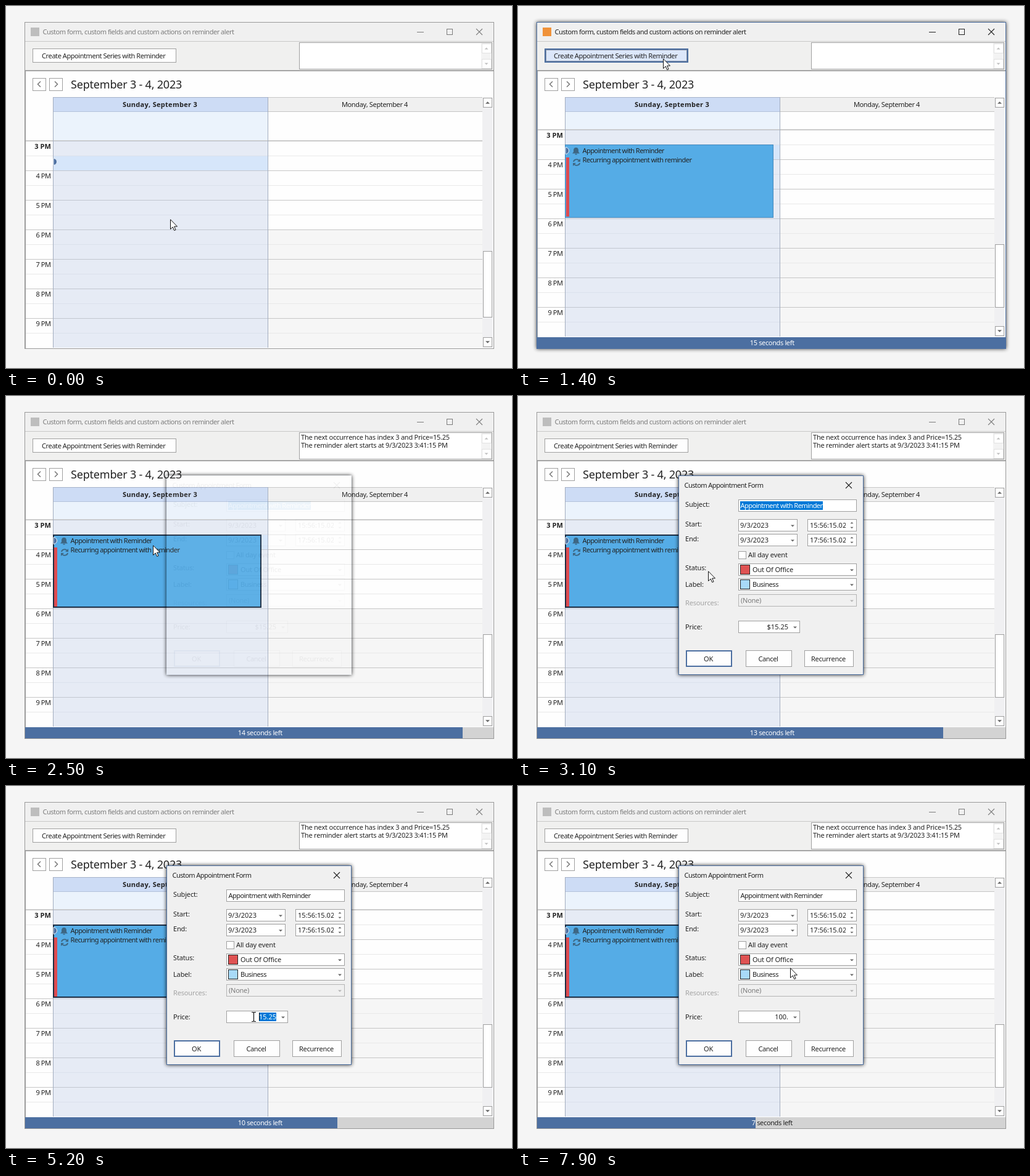
These frames come from a looping animation (820 by 588 pixels, 8 s). An HTML page:

```html
<!DOCTYPE html>
<html lang="en">
<head>
<meta charset="utf-8">
<title>Reminder alert</title>
<style>
html, body { margin: 0; width: 100%; height: 100%; overflow: hidden; background: #f5f5f5; }
svg { display: block; width: 100%; height: 100%; }
text { font: 11px "Noto Sans", "Open Sans", sans-serif; font-kerning: none; fill: #222; white-space: pre; }
.bold { font-weight: 700; }
.date { font-size: 18px; }
.mid { text-anchor: middle; }
.end { text-anchor: end; }
.white { fill: #fff; }
.dim { fill: #a3a3a3; }
.gray { fill: #7c7c7c; }
</style>
</head>
<body>
<svg id="stage" viewBox="0 0 820 588"></svg>
<script>
const LOOP = 8000, STEP = 100;
const BLUE = '#4c6fa1', EDGE = '#a0a0a0', SELECT = '#0078d7';
const stage = document.getElementById('stage');

// Cursor keys: time, x, y, eased arrival
const PATH = [
  [0, 266, 346], [800, 235, 85, 1], [1500, 235, 85], [2200, 238, 242, 1],
  [2800, 238, 242], [3100, 308, 284], [3700, 414, 370], [3800, 420, 375],
  [4000, 420, 375], [4200, 424, 375], [4300, 424, 375], [4500, 440, 375],
  [4900, 401, 375], [7200, 401, 375], [7900, 441, 295], [8000, 441, 295]
];

function cursorAt(t) {
  const i = Math.max(1, PATH.findIndex(k => k[0] >= t));
  const a = PATH[i - 1], b = PATH[i];
  let u = (t - a[0]) / (b[0] - a[0]);
  if (b[3]) u = u * u * (3 - 2 * u);
  return { x: Math.round(a[1] + (b[1] - a[1]) * u), y: Math.round(a[2] + (b[2] - a[2]) * u) };
}

const within = (t, a, b) => t >= a && t < b;
const fill = (x, y, w, h, color) => `<rect x="${x}" y="${y}" width="${w}" height="${h}" fill="${color}"/>`;
const hline = (x0, x1, y, color) => fill(x0, y, x1 - x0, 1, color);
const vline = (x, y0, y1, color) => fill(x, y0, 1, y1 - y0, color);
const line = (d, color, w = 1) => `<path d="${d}" fill="none" stroke="${color}" stroke-width="${w}"/>`;
const shape = (d, color) => `<path d="${d}" fill="${color}"/>`;
const text = (x, y, s, spacing = -.46, cls = '') =>
  `<text x="${x}" y="${y}" letter-spacing="${spacing}" class="${cls}">${s}</text>`;

// Framed box whose border pixels lie on the given coordinates
const box = (x0, y0, x1, y1, color = '#fff', edge = EDGE, w = 1) =>
  `<rect x="${x0 + w / 2}" y="${y0 + w / 2}" width="${x1 - x0 + 1 - w}" height="${y1 - y0 + 1 - w}" fill="${color}" stroke="${edge}" stroke-width="${w}"/>`;

const clip = (id, x, y, w, h, body) =>
  `<clipPath id="${id}"><rect x="${x}" y="${y}" width="${Math.max(0, w)}" height="${h}"/></clipPath><g clip-path="url(#${id})">${body}</g>`;

const tri = (x, y, r, up, color = '#666') =>
  shape(`M${x - r} ${y + (up ? r / 2 : -r / 2)}h${2 * r}l${-r} ${up ? -r : r}z`, color);

const cross = (x, y, color) => line(`M${x} ${y}l10 10m0 -10l-10 10`, color, 1.1);

// Soft shadow that stays outside its rectangle
const shadow = (id, x, y, w, h, alpha) =>
  `<clipPath id="${id}"><path clip-rule="evenodd" d="M${x - 14} ${y - 14}h${w + 28}v${h + 28}h${-w - 28}zM${x} ${y}v${h}h${w}v${-h}z"/></clipPath>
   <g clip-path="url(#${id})" opacity="${alpha}"><rect x="${x}" y="${y}" width="${w}" height="${h}" filter="url(#blur)"/></g>`;

const DEFS = '<defs><filter id="blur" x="-10%" y="-10%" width="120%" height="120%"><feGaussianBlur stdDeviation="3"/></filter></defs>';

function titleBar(active) {
  const ink = active ? '#222' : '#7c7c7c';
  return fill(31, 27, 759, 30, '#f0f0f0') +
    fill(40, 35, 14, 14, active ? '#f0923a' : '#bdbdbd') +
    text(59.5, 46, 'Custom form, custom fields and custom actions on reminder alert', -.48, active ? '' : 'gray') +
    hline(666, 677, 42, ink) + box(714, 37, 723, 46, 'none', ink) + cross(762, 37, ink);
}

function toolbar(t, cursor, active) {
  const hover = within(cursor.x, 43, 276) && within(cursor.y, 69, 92);
  const color = within(t, 1200, 1400) ? '#cddbf5' : hover ? '#dce7fa' : '#fefefe';
  let s = fill(31, 57, 759, 48, '#f0f0ef') + hline(31, 790, 57, '#c8c8c8') + hline(31, 790, 104, '#a8a8a8');
  s += active
    ? box(43, 69, 275, 91, color, BLUE, 2) + `<rect x="45.5" y="71.5" width="228" height="18" fill="none" stroke="#28344a" stroke-dasharray="1 1"/>`
    : box(43, 69, 275, 91, color);
  s += text(58, 85, 'Create Appointment Series with Reminder', -.44);
  s += box(475, 59, 787, 102) + fill(770, 60, 17, 42, '#f3f3f3');
  s += box(771, 61, 786, 76, '#fff', '#e2e2e2') + tri(778.5, 69, 3, true, '#c0c0c0');
  s += box(771, 86, 786, 101, '#fff', '#e2e2e2') + tri(778.5, 94, 3, false, '#c0c0c0');
  if (t >= 1600) {
    s += text(478, 71, 'The next occurrence has index 3 and Price=15.25', -.24) +
      text(478, 84, 'The reminder alert starts at 9/3/2023 3:41:15 PM', -.26);
  }
  return s;
}

function appointment(selected) {
  const ink = '#3d6784';
  return box(76, 225, 413, 343, '#55ace6', selected ? '#1b2c42' : '#4387bb', selected ? 2 : 1) +
    fill(78, 246, 5, 96, '#de4b50') +
    shape('M94 230c3 0 4 2 4 5v2l2 2.500h-12l2-2.500v-2c0-3 1-5 4-5zM92.500 240h3v1.500h-3z', ink) +
    line('M90 253a5 4.500 0 0 1 9-2M100 255a5 4.500 0 0 1-9 2', ink, 1.8) +
    shape('M101 248v5h-5zM89 260v-5h5z', ink) +
    text(104.500, 239, 'Appointment with Reminder', -.57) +
    text(104.500, 254, 'Recurring appointment with reminder', -.57);
}

function scheduler(t) {
  const booked = t >= 1400;
  const top = booked ? 201 : 219, bottom = booked ? 537 : 555;
  let s = fill(31, 106, 759, 450, '#fefefe') + vline(31, 105, 556, EDGE) + hline(31, 790, 105, EDGE);
  s += box(43, 117, 64, 137) + box(70, 117, 91, 137);
  s += line('M56 122.500l-4.500 4.500 4.500 4.500M79 122.500l4.500 4.500-4.500 4.500', '#777', 1.5);
  s += text(105, 134, 'September 3 - 4, 2023', -.2, 'date');

  s += fill(76, 148, 349, 24, '#cddcf5') + fill(425, 148, 347, 24, '#f0f0f0');
  s += hline(76, 425, 148, '#a5b2ca') + hline(425, 772, 148, '#c8c8c8');
  s += hline(76, 425, 171, '#b4c2db') + hline(425, 772, 171, '#c4c4c4');
  s += text(249.500, 164, 'Sunday, September 3', .29, 'bold mid') + text(597.500, 164, 'Monday, September 4', -.36, 'mid');
  s += fill(77, 172, 347, top - 172, '#ebf3fc');

  s += fill(77, top, 347, bottom - top, '#e6ebf5') + fill(425, top + 144, 347, bottom - top - 144, '#f6f6f6');
  s += fill(77, top + 24, 347, 24, '#d6e6fa');
  for (let i = 0, y = top; y < bottom; i++, y += 24) {
    const hour = i % 2 === 0;
    s += hline(32, 772, y, hour ? '#c6c6c6' : '#e9e9e9') + hline(77, 424, y, hour ? '#c2c7d0' : '#dbe1ec');
    if (hour) s += text(i ? 72.5 : 73, y + 13, `${3 + i / 2} PM`, i ? -.45 : .1, i ? 'end' : 'bold end');
  }
  s += hline(32, 772, top - 1, '#cfcfcf');
  s += vline(76, 148, bottom, '#a3adbf') + vline(424, 148, bottom, '#a3adbf');
  if (booked) s += appointment(t >= 2500);
  const y = top + 34;
  s += `<path d="M77 ${y - 5.500}a5.500 5.500 0 0 1 0 11z" fill="${BLUE}" stroke="#eaf2fb"/>`;

  const [thumbTop, thumbEnd] = booked ? [387, 489] : [398, 505];
  s += fill(772, 149, 17, bottom - 149, '#f0f0f2');
  s += box(773, 149, 787, 164) + tri(780.5, 157, 3.5, true);
  s += box(773, thumbTop, 787, thumbEnd);
  s += box(773, bottom - 17, 787, bottom - 2) + tri(780.5, bottom - 9, 3.5, false);
  return s + (booked ? countdown(t) : '');
}

function countdown(t) {
  const left = Math.min(15, 15 - Math.floor((t - 1450) / 750));
  const width = Math.round(759.5 * left / 15);
  const label = cls => text(411.8, 551, `${left} seconds left`, -.36, `mid ${cls}`);
  return fill(31, 538, 759, 18, '#d3d3d3') + fill(31, 538, width, 18, BLUE) +
    clip('rest', 31 + width, 538, 759 - width, 18, label('')) +
    clip('done', 31, 538, width, 18, label('white'));
}

function price(t, cursor) {
  const typing = t >= 5900;
  const value = t < 4500 ? '$15.25' : typing ? '100'.slice(0, (t - 5800) / 100) + '.' : '15.25';
  const label = cls => text(438, 379, value, 0, `end ${cls}`);
  let s = box(357, 365, 456, 384) + tri(449, 376, 3, false) + label('');
  let caret = 434;
  if (within(t, 4500, 5900)) {
    const reach = Math.max(0, Math.floor((438 - cursor.x) / 6)) * 6;
    caret = Math.max(410, 438 - reach);
    s += fill(caret, 368, 438 - caret, 14, SELECT) + clip('picked', caret, 366, 438 - caret, 18, label('white'));
  }
  const on = within(t, 4500, 5300) || within(t, 5700, 6500) || within(t, 7000, 7500);
  return s + (on ? vline(caret, 368, 381, '#111') : '');
}

function dialog(t, cursor) {
  const caption = (y, s, cls = '') => text(271, y, s, -.15, cls);
  const button = (x0, x1, s, spacing, main) =>
    box(x0, 413, x1, 439, '#fefefe', main ? BLUE : EDGE, main ? 2 : 1) +
    text((x0 + x1) / 2 - .5, 431, s, spacing, 'mid');
  const dateRow = (y, id, time) =>
    box(357, y, 452, y + 19) + text(360, y + 14, '9/3/2023', 0) + tri(445, y + 11, 3, false) +
    box(469, y, 548, y + 19) + clip(id, 470, y, 61, 20, text(473, y + 14, time, 0)) +
    tri(541, y + 6, 2.5, true) + tri(541, y + 14, 2.5, false);
  const combo = (y, color, s, spacing) =>
    box(357, y, 548, y + 19) + box(360, y + 2, 375, y + 17, color, '#222') +
    text(380, y + 14, s, spacing) + tri(541, y + 11, 3, false);
  const picked = t < 4500;

  return box(260, 129, 559, 452, '#f0f0f0', BLUE) +
    text(269.5, 149, 'Custom Appointment Form', -.56) + cross(531, 140, '#222') +
    caption(180, 'Subject:') + box(357, 168, 548, 187) + (picked ? fill(360, 171, 134, 14, SELECT) : '') +
    text(360.5, 182, 'Appointment with Reminder', -.54, picked ? 'white' : '') +
    caption(212, 'Start:') + dateRow(200, 'start', '15:56:15.02') +
    caption(236, 'End:') + dateRow(224, 'finish', '17:56:15.02') +
    box(357, 252, 369, 264) + text(373, 262, 'All day event', -.15) +
    caption(283, 'Status:') + combo(272, '#df5252', 'Out Of Office', -.15) +
    caption(310, 'Label:') + combo(296, '#a8daf8', 'Business', -.45) +
    caption(340, 'Resources:', 'dim') + box(357, 322, 548, 341, '#f0f0f0', '#b4b4b4') +
    text(361, 336, '(None)', -.25, 'gray') + tri(541, 333, 3, false, '#b4b4b4') +
    caption(379, 'Price:') + price(t, cursor) +
    button(272, 346, 'OK', -.1, true) + button(369, 443, 'Cancel', -.35) + button(464, 543, 'Recurrence', -.27);
}

function pointer({ x, y }, open) {
  const beam = open && within(x, 358, 444) && within(y, 366, 385);
  const d = 'M-3 -7.500h2.500l1 1 1-1h2.500M.5 -6.500v13M-3 7.500h2.500l1-1 1 1h2.500';
  return `<g transform="translate(${x} ${y})">` + (beam
    ? line(d, '#fff', 2.4) + line(d, '#111', 1.2)
    : '<path d="M.5 .8v15.700l3.700-3.500 2.500 5.600 2.400-1-2.500-5.500h4.900z" fill="#fff" stroke="#111"/>') + '</g>';
}

function render(t) {
  const cursor = cursorAt(t);
  const active = within(t, 1200, 2500), open = t >= 2500;
  let s = DEFS + fill(0, 0, 820, 588, '#f5f5f5');
  if (active) s += shadow('glow', 30, 26, 761, 531, .75);
  s += titleBar(active) + toolbar(t, cursor, active) + scheduler(t);
  s += box(30, 26, 790, 556, 'none', active ? BLUE : '#999');
  if (open) {
    const alpha = t < 2600 ? .06 : t < 2700 ? .6 : 1;
    s += shadow('lift', 260, 129, 300, 324, .85) + `<g opacity="${alpha}">${dialog(t, cursor)}</g>`;
  }
  stage.innerHTML = s + pointer(cursor, open);
}

let shown = -1;
function tick() {
  const t = Math.floor(performance.now() % LOOP / STEP) * STEP;
  if (t !== shown) render(shown = t);
  requestAnimationFrame(tick);
}
tick();
</script>
</body>
</html>
```
